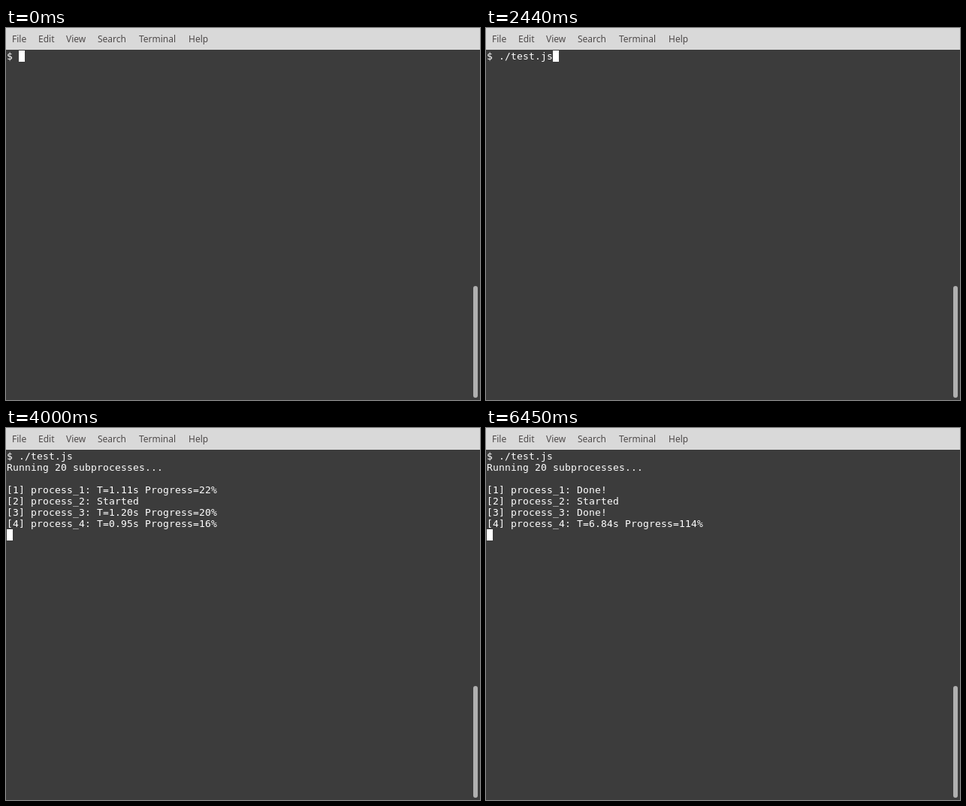
These frames come from a looping animation (631 px wide and 496 px high, 8000 ms). An HTML page:

```html
<!DOCTYPE html>
<html lang="en">
<head>
<meta charset="utf-8">
<title>Terminal</title>
<style>
  html, body { margin: 0; width: 100%; height: 100%; overflow: hidden; background: #3c3c3c; }
  svg { position: absolute; left: 0; top: 0; }
  text { white-space: pre; font: 13px "DejaVu Sans Mono", monospace; fill: #fff; }
  nav {
    position: absolute; left: 0; top: 0; width: 631px; height: 29px;
    background: #d9d9d9; color: #4e4a4a;
    font: 12px/29px "Noto Sans", "Open Sans", sans-serif;
  }
  nav span { position: absolute; }
</style>
</head>
<body>
<svg width="631" height="496" viewBox="0 0 631 496">
  <rect x="622" y="344" width="6" height="149" rx="3" fill="#b0b0b0"/>
  <g id="lines"></g>
  <rect id="cursor" width="8" height="15" fill="#fff"/>
</svg>
<nav>
  <span style="left:8px">File</span>
  <span style="left:43px">Edit</span>
  <span style="left:80px">View</span>
  <span style="left:122px">Search</span>
  <span style="left:177px">Terminal</span>
  <span style="left:243px">Help</span>
</nav>
<script>
const LOOP = 8000, COL = 8, ROW = 15, LEFT = 1, TOP = 30, BASELINE = 12;
const COMMAND = "./test.js";
const PROCESSES = 4;

// Bursts of evenly spaced steps: [first, last, count]
const BURSTS = [
  [850, 850, 1], [1140, 1140, 1], [1640, 2000, 5], [2320, 2440, 2],
  [2780, 2860, 2], [3140, 3590, 6], [4000, 4160, 3], [4380, 4660, 4],
  [5000, 5020, 2], [5250, 5340, 3], [5680, 5780, 2], [5930, 6090, 3], [6350, 6450, 2]
];
const STEPS = BURSTS.flatMap(([first, last, count]) =>
  Array.from({ length: count }, (_, i) => first + (last - first) * i / (count - 1 || 1)));

const ENTER = COMMAND.length + 1, OUTPUT = ENTER + 1;
const CURSOR_OFF = [[2860, 3590], [5000, 6350]];

// Workers report in turn; keys hold the elapsed seconds of every second report
const WORKERS = [
  { id: 1, duration: 5, keys: [1.11, 3.01, 4.91] },
  { id: 3, duration: 6, keys: [1.20, 3.05, 5.14] },
  { id: 4, duration: 6, keys: [0.95, 3.05, 4.94, 6.84] }
];

const group = document.getElementById("lines");
const cursor = document.getElementById("cursor");
const lines = Array.from({ length: 3 + PROCESSES }, (_, row) => {
  const line = document.createElementNS("http://www.w3.org/2000/svg", "text");
  line.setAttribute("y", TOP + row * ROW + BASELINE);
  return group.appendChild(line);
});

// Characters sit on the terminal's cell grid
function setLine(row, content) {
  const line = lines[row];
  if (line.textContent === content) return;
  line.setAttribute("x", Array.from(content, (_, col) => LEFT + col * COL).join(" "));
  line.textContent = content;
}

function elapsed({ keys }, report) {
  const position = (report - 1) / 2;
  const i = Math.min(Math.floor(position), keys.length - 2);
  return keys[i] + (keys[i + 1] - keys[i]) * (position - i);
}

function status(worker, reports) {
  if (reports < 1) return "Started";
  if (reports > 1 && elapsed(worker, reports - 1) > worker.duration) return "Done!";
  const seconds = elapsed(worker, reports);
  const percent = Math.round(seconds / worker.duration * 100);
  return `T=${seconds.toFixed(2)}s Progress=${percent}%`;
}

function render(t) {
  const step = STEPS.filter(time => time <= t).length;
  const typed = Math.min(step, COMMAND.length);
  const started = step - OUTPUT;
  const reports = Math.max(0, started - PROCESSES);

  setLine(0, "$ " + COMMAND.slice(0, typed));
  setLine(1, step >= OUTPUT ? "Running 20 subprocesses..." : "");
  for (let id = 1; id <= PROCESSES; id++) {
    const turn = WORKERS.findIndex(worker => worker.id === id);
    const count = Math.ceil((reports - turn) / WORKERS.length);
    const state = turn < 0 ? "Started" : status(WORKERS[turn], count);
    setLine(2 + id, id <= started ? `[${id}] process_${id}: ${state}` : "");
  }

  const row = step < ENTER ? 0 : step < OUTPUT ? 1 : 3 + PROCESSES;
  const col = row === 0 ? 2 + typed : 0;
  const hidden = CURSOR_OFF.some(([from, to]) => t >= from && t < to);
  cursor.setAttribute("x", LEFT + col * COL);
  cursor.setAttribute("y", TOP + row * ROW);
  cursor.setAttribute("visibility", hidden ? "hidden" : "visible");
}

const start = performance.now();
function tick() {
  render((performance.now() - start) % LOOP);
  requestAnimationFrame(tick);
}
render(0);
requestAnimationFrame(tick);
</script>
</body>
</html>
```
